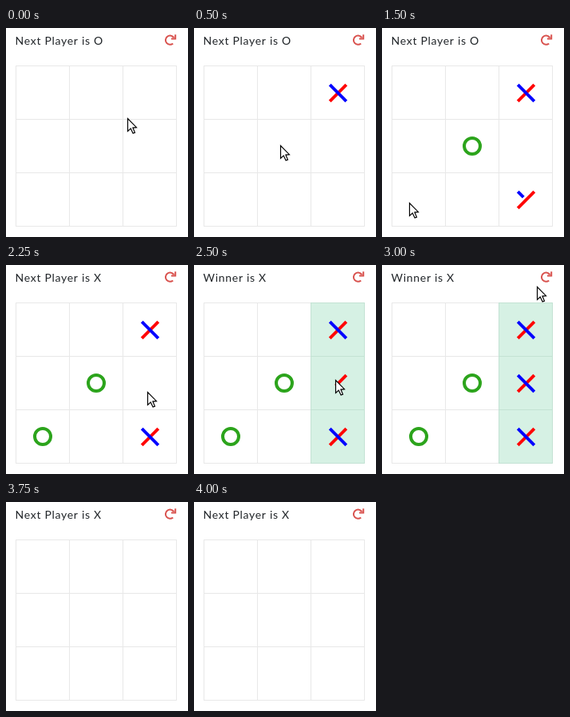
An HTML page with a canvas that plays this animation: 228x262 px, repeating every 4250 ms.

```html
<!DOCTYPE html>
<html lang="en">
<head>
<meta charset="utf-8">
<title>Tic-tac-toe</title>
<style>
html, body { margin: 0; width: 100%; height: 100%; overflow: hidden; background: #fff; }
canvas { display: block; }
</style>
</head>
<body>
<canvas id="stage"></canvas>
<script>
const W = 228, H = 262, STEP = 250, STEPS = 17;
const LEFT = 12, TOP = 47, CELL = 67;
const canvas = document.getElementById("stage");
const ctx = canvas.getContext("2d");
const ratio = window.devicePixelRatio || 1;
canvas.width = W * ratio;
canvas.height = H * ratio;
canvas.style.width = W + "px";
canvas.style.height = H + "px";

// Pointer tip at each step; it is off the stage after the reset.
const pointer = [
  [152, 113], [106, 150], [108, 147], [153, 194], [178, 218], [178, 218],
  [34, 219], [30, 219], [147, 185], [177, 159], [177, 144], [188, 18],
  [194, 27], [200, 17], [202, 17]
];

// part: how much of the mark is drawn during its first step.
const marks = [
  { type: "X", col: 2, row: 0, from: 1, part: 0.72 },
  { type: "O", col: 1, row: 1, from: 3, part: 0.5 },
  { type: "X", col: 2, row: 2, from: 6, part: 0.67 },
  { type: "O", col: 0, row: 2, from: 8, part: 0.5 },
  { type: "X", col: 2, row: 1, from: 10, part: 0.32 }
];

const titles = [
  [0, "Next Player is O"], [3, "Next Player is X"], [6, "Next Player is O"],
  [8, "Next Player is X"], [10, "Winner is X"], [15, "Next Player is X"]
];
const WIN = 10, RESET = 15;

function stroke(color, width) {
  ctx.strokeStyle = color;
  ctx.lineWidth = width;
  ctx.stroke();
}

function path(points) {
  ctx.beginPath();
  points.forEach(([x, y]) => ctx.lineTo(x, y));
}

function drawGrid() {
  ctx.fillStyle = "#e8e8e8";
  for (let i = 0; i < 4; i++) {
    ctx.fillRect(LEFT + i * CELL, TOP, 1, 3 * CELL + 1);
    ctx.fillRect(LEFT, TOP + i * CELL, 3 * CELL + 1, 1);
  }
}

function drawWin() {
  const x = LEFT + 2 * CELL, size = 3 * CELL + 1;
  ctx.fillStyle = "#d6f1e4";
  ctx.fillRect(x, TOP, CELL + 1, size);
  ctx.fillStyle = "#c3e2d3";
  for (let i = 0; i < 4; i++) ctx.fillRect(x, TOP + i * CELL, CELL + 1, 1);
  ctx.fillRect(x, TOP, 1, size);
  ctx.fillRect(x + CELL, TOP, 1, size);
}

function drawCross(x, y, p) {
  const r = 10.3;
  const line = (dir, part, color) => {
    if (part <= 0) return;
    const end = -r + 2 * r * part;
    path([[x - dir * r, y - r], [x + dir * end, y + end]]);
    stroke(color, 4);
  };
  line(-1, Math.min(1, 2 * p), "#ff0000");
  line(1, 2 * p - 1, "#0000ff");
}

function drawRing(x, y, p) {
  const start = -Math.PI / 2;
  ctx.beginPath();
  ctx.arc(x, y, 10, start, start + 2 * Math.PI * p);
  stroke("#2ca41c", 4);
}

function drawMark(mark, step) {
  if (step < mark.from) return;
  const p = step === mark.from ? mark.part : 1;
  const x = LEFT + (mark.col + 0.5) * CELL + 0.5;
  const y = TOP + (mark.row + 0.5) * CELL + 0.5;
  if (mark.type === "X") drawCross(x + 0.5, y + 0.5, p);
  else drawRing(x, y, p);
}

function drawReload() {
  const color = "#d9534f";
  ctx.beginPath();
  ctx.arc(205.5, 15.2, 5.6, 0.85, 5.75);
  stroke(color, 2);
  path([[212.2, 8.2], [212.2, 13.4], [207, 13.4]]);
  stroke(color, 2);
}

function drawPointer([x, y]) {
  ctx.save();
  ctx.translate(x + 0.5, y + 0.5);
  path([[0, 0], [0, 16], [3.7, 12.6], [6.6, 18.6], [9, 17.6], [6.4, 11.6], [11, 11.2]]);
  ctx.closePath();
  ctx.fillStyle = "#fff";
  ctx.fill();
  stroke("#000", 1.2);
  ctx.restore();
}

function drawTitle(step) {
  const text = titles.filter(([from]) => from <= step).pop()[1];
  ctx.font = "14px Lato, 'Open Sans', sans-serif";
  ctx.letterSpacing = "0.7px";
  ctx.fillStyle = "#212529";
  ctx.fillText(text, 11.6, 21);
}

function draw(now) {
  const step = Math.floor(now / STEP) % STEPS;
  ctx.setTransform(ratio, 0, 0, ratio, 0, 0);
  ctx.fillStyle = "#fff";
  ctx.fillRect(0, 0, W, H);
  drawTitle(step);
  drawReload();
  drawGrid();
  if (step < RESET) {
    if (step >= WIN) drawWin();
    marks.forEach(mark => drawMark(mark, step));
    drawPointer(pointer[step]);
  }
}

const begin = performance.now();
function tick() {
  draw(performance.now() - begin);
  requestAnimationFrame(tick);
}
tick();
</script>
</body>
</html>
```
